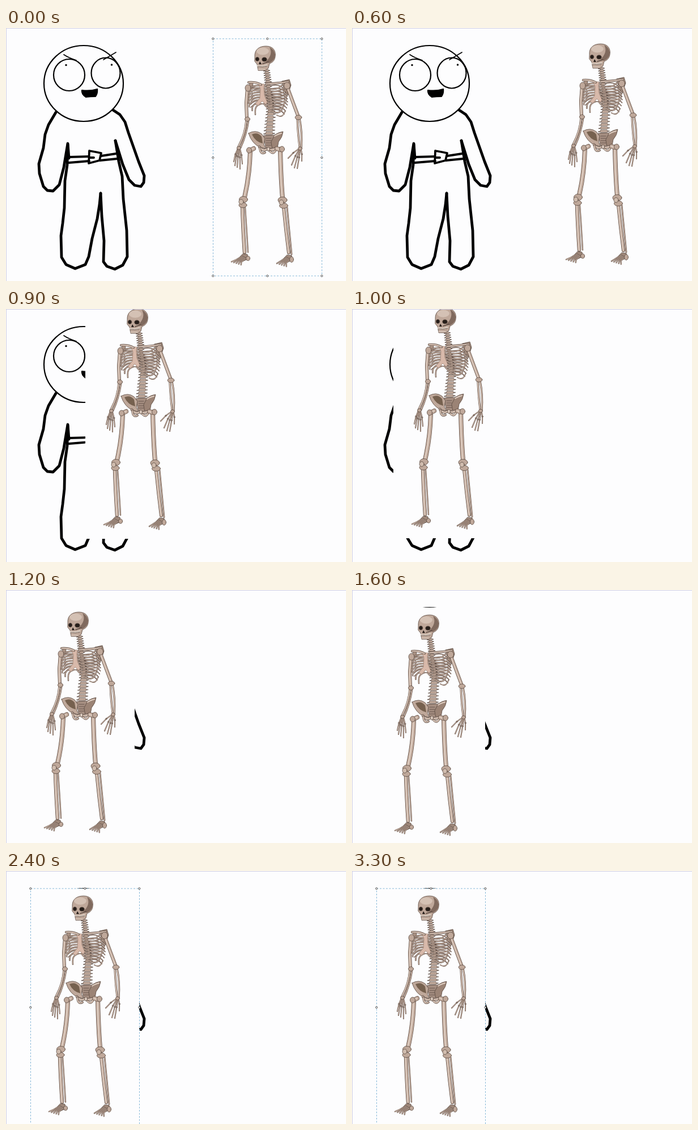
These frames come from a looping animation (600x447 px, 4 s). An HTML page:

```html
<!DOCTYPE html>
<html lang="en">
<head>
<meta charset="utf-8">
<title>Skeleton drag</title>
<style>
  html, body { margin: 0; width: 100%; height: 100%; overflow: hidden; background: #fdfdfe; }
  svg { display: block; width: 100vw; height: 100vh; }
  .ink { fill: none; stroke: #000; stroke-linecap: round; stroke-linejoin: round; }
</style>
</head>
<body>
<svg viewBox="0 0 600 447">
  <g class="ink" stroke-width="2.2">
    <ellipse cx="137" cy="98" rx="70" ry="67"/>
    <ellipse cx="111.500" cy="83" rx="27.500" ry="28"/>
    <ellipse cx="176" cy="79.500" rx="25.500" ry="27"/>
    <path stroke-width="1.7" d="M102 47Q111 53 124 57M194 43Q184 49 172 56"/>
    <circle cx="106" cy="65.500" r="1" stroke-width="1.5"/>
    <circle cx="186.500" cy="65" r="1" stroke-width="1.5"/>
    <path fill="#000" d="M134 110Q148 112 161 108Q162 115 158 121Q149 121 141 122Q133 117 134 110Z"/>
  </g>
  <g class="ink" stroke-width="4.800">
    <path d="M88 149L75 171L69 188L66 212L58 240L59 257L66 280L73 287L83 288L94 277L102 246L109 204L111 230"/>
    <path d="M109 206L108 242L104 270L103 318L100 345L97 367L98 405L106 418L122 425L140 418L146 404L152 372L161 337L165 312L167 292"/>
    <path d="M167 292L169 332L173 376L172 413L178 421L192 426L206 419L214 404L213 358L207 302L205 262L199 236L193 199"/>
    <path d="M189 145L201 153L210 166L216 185L222 202L234 236L244 261L243 273L238 280L227 278L217 268L206 241L193 199"/>
    <g stroke-width="3.800">
      <path d="M111 228L146 227M111 238L147 235M168 226L194 222M166 234L196 231"/>
      <path d="M147 217L146 239L165 234L168 221L158 219L147 217M148 229L155 229"/>
    </g>
  </g>
  <g id="pic">
    <rect x="365" y="19" width="192" height="419" fill="#fdfdfe"/>
    <g id="bones" stroke-linecap="round" stroke-linejoin="round"></g>
    <g id="frame" fill="#fff" stroke="#555" stroke-width="1">
      <rect x="365.500" y="19" width="192" height="419" fill="none" stroke="#86b8d8" stroke-dasharray="3 2.500"/>
    </g>
  </g>
  <path d="M0 .5H600M.5 0V447" stroke="#d0d0e6" fill="none"/>
</svg>
<script>
const DARK = '#59483f', MID = '#bfa89a', LIGHT = '#dfcec2';
const get = id => document.getElementById(id);
const bones = get('bones'), frame = get('frame'), pic = get('pic');

function add(parent, tag, attrs) {
  const el = document.createElementNS('http://www.w3.org/2000/svg', tag);
  for (const k in attrs) el.setAttribute(k, attrs[k]);
  return parent.appendChild(el);
}
const line = (d, stroke, w, extra) =>
  add(bones, 'path', { d, stroke, 'stroke-width': w, fill: 'none', ...extra });
const shape = (d, fill = MID, stroke = DARK, w = 0.8) =>
  add(bones, 'path', { d, fill, stroke, 'stroke-width': w });
const knob = (cx, cy, rx, ry = rx, fill = MID) =>
  add(bones, 'ellipse', { cx, cy, rx, ry, fill, stroke: DARK, 'stroke-width': 0.8 });

// A rounded bone: dark edge, mid tone, light ridge
function bone(d, w) {
  line(d, DARK, w);
  line(d, MID, Math.max(w - 1.3, w * 0.6));
  if (w > 3) line(d, LIGHT, w * 0.28, { transform: 'translate(-.5 0)' });
}

function vertebrae(x0, y0, x1, y1, n, w0, w1) {
  const step = (y1 - y0) / n;
  for (let i = 0; i <= n; i++) {
    const k = i / n, w = w0 + (w1 - w0) * k;
    const x = x0 + (x1 - x0) * k, y = y0 + step * i;
    line(`M${x - w * 0.75} ${y + 1}L${x + w * 0.75} ${y}`, DARK, 1.4);
    add(bones, 'rect', { x: x - w / 2, y: y - step * 0.4, width: w, height: step * 0.75, rx: 1.2,
      fill: MID, stroke: DARK, 'stroke-width': 0.6 });
  }
}

function torso() {
  // Back ribs behind the spine
  for (let i = 0; i < 9; i++) {
    const y = 103 + i * 5.4, reach = 26 + 6 * Math.sin(i / 8 * Math.PI);
    line(`M465 ${y}Q${465 + reach * 0.7} ${y - 6} ${465 + reach} ${y + 6}`, '#7d685d', 1.7);
    if (i < 7) line(`M462 ${y}Q440 ${y - 5} ${434 - i * 0.4} ${y + 5}`, '#857065', 1.4);
  }
  vertebrae(460, 75, 463, 99, 6, 7, 8);
  vertebrae(463, 103, 467, 147, 9, 7, 10);
  vertebrae(467, 152, 464, 192, 7, 11, 13);
  shape('M487 94L500 91L503 101L497 119L491 110Z', '#a89183');
  shape('M430 95L436 97L435 108L429 106Z', '#a89183');
  // Front ribs
  for (let i = 0; i < 9; i++) {
    const y = 102 + i * 4, drop = i * i * 0.2;
    const left = 432 - 4 * Math.sin(i / 8 * Math.PI) + (i > 6 ? (i - 6) * 4 : 0);
    const side = 487 + 9 * Math.sin(i / 8 * Math.PI);
    bone(`M450 ${y}C441 ${y - 1 + drop * 0.3} ${left - 1} ${y + drop * 0.5} ${left} ${y + 6 + drop}`, 2.5);
    bone(`M455 ${y}C463 ${y + 6 + drop * 0.3} ${side - 9} ${y + 10 + drop} ${side} ${y + drop * 0.9 - 1}`, 2.6);
  }
  bone('M478 154Q488 160 492 148', 2);
  shape('M446 99L456 99L455 106L456 119L461 131L458 135L452 129L445 137L440 134L448 124L449 108Z', '#d8b9aa', '#a3887a');
  bone('M428 96Q440 95 450 100', 4);
  bone('M459 99Q478 98 498 95', 4);
}

function skull() {
  shape('M439 51C438 37 448 32 459 32C471 32 477 40 475 51C474 58 470 61 465 63L463 71L458 75L445 75L443 64L439 59Z', MID);
  shape('M458 60L465 62Q475 57 475 47Q473 37 465 34Q472 47 458 60Z', '#806a5e', 'none');
  add(bones, 'ellipse', { cx: 453, cy: 41, rx: 11, ry: 6.5, fill: LIGHT, opacity: 0.65 });
  const hole = '#251d19';
  knob(443.5, 55, 3.2, 3.5, hole);
  knob(456, 55.5, 4.2, 3.6, hole);
  shape('M448 59L451 64L446 64Z', hole, 'none');
  line('M453 63L463 60', DARK, 1.6);
  line('M444 67Q452 69 460 66', '#eadfd4', 3);
  line('M444 68Q452 70 461 67', DARK, 0.8);
  for (let x = 446; x < 460; x += 2.5) line(`M${x} 66v4`, '#8d786d', 0.4);
  line('M445 73L457 73', LIGHT, 1.4);
}

function pelvis() {
  shape('M455 190L475 189L470 211L463 218L458 209Z', '#a58e81');
  shape('M428 186Q440 179 451 187L457 195L455 206L459 213L449 211Q434 205 428 186Z', MID);
  shape('M434 188Q444 183 451 192L453 204Q440 201 434 188Z', '#76614f', 'none');
  shape('M468 201L474 189Q481 184 489 183Q488 193 481 201L479 212L470 212Z', '#9b8375');
  line('M474 191Q481 187 486 186', LIGHT, 2);
  bone('M447 210Q454 219 462 213Q470 218 478 211', 4.5);
  bone('M448 212Q449 224 457 220', 3.8);
  bone('M477 213Q473 225 466 218', 3.8);
  knob(463, 214, 2.5, 3.5, LIGHT);
  for (let i = 0; i < 4; i++) line(`M459 ${195 + i * 4}h9`, DARK, 0.8);
}

function arms() {
  bone('M426 107L424 133L425 159', 6);
  knob(427, 106, 5, 6);
  bone('M424 163Q423 186 410 210', 3.6);
  bone('M428 163Q424 190 414 211', 3);
  knob(426, 161, 4.5, 3.8);
  bone('M496 103L506 130L515 154', 6);
  knob(496, 102, 5.5, 6);
  bone('M514 160Q515 186 518 209', 3.4);
  bone('M518 160Q523 185 521 211', 3.4);
  knob(516, 158, 5.8, 4);
  hand(411, 212, [[402, 236], [404, 243], [408, 246], [413, 249], [417, 240]]);
  hand(519, 213, [[498, 230], [504, 242], [509, 247], [514, 248], [522, 235]]);
}

function hand(x, y, tips) {
  tips.forEach(([tx, ty], i) => {
    const mx = x + (tx - x) * 0.5 + (i - 2) * 0.8, my = y + (ty - y) * 0.45;
    bone(`M${x + (i - 2) * 0.8} ${y}L${mx} ${my}L${tx} ${ty}`, 2.1);
    knob(mx, my, 1.2);
  });
  knob(x, y, 3.5, 3);
}

function legs() {
  bone('M431 217Q430 260 421 299', 8);
  bone('M437 213L431 216', 8);
  knob(429, 216, 4.5, 5);
  bone('M422 317Q425 360 427 396', 2.4);
  bone('M417 315Q418 350 421 396', 6.5);
  knob(419, 303, 7.5, 5.5);
  knob(418, 313, 7, 4.5);
  knob(415, 307, 4, 4.3, '#d0bcae');
  bone('M484 214Q485 265 488 300', 8);
  bone('M478 213L484 215', 8);
  knob(487, 214, 4.5, 5);
  bone('M496 317Q500 358 504 400', 2.8);
  bone('M490 317Q494 358 499 397', 6);
  knob(488, 304, 8, 5.5);
  knob(490, 314, 7.5, 4.5);
  knob(486, 308, 4, 4.3, '#d0bcae');
  foot(422, 402, 398, 416);
  knob(427, 407, 3.5, 4);
  foot(500, 404, 478, 419);
  knob(504, 409, 3.5, 5);
}

function foot(x, y, tx, ty) {
  shape(`M${x - 4} ${y - 3}L${x + 4} ${y - 2}L${x + 5} ${y + 6}L${x - 6} ${y + 11}L${x - 14} ${y + 8}Z`, '#9f887a');
  for (let i = 0; i < 5; i++) {
    const ex = tx + i * 4.2, ey = ty - 3 + i * 1.3;
    bone(`M${x - 5 + i * 1.6} ${y + 1 + i}L${(x + ex) / 2 - 3} ${y + 7 + i}L${ex} ${ey}`, 2.4);
  }
}

torso();
skull();
pelvis();
legs();
arms();

for (const x of [365, 461, 557])
  for (const y of [19, 229, 438])
    if (x !== 461 || y !== 229) add(frame, 'circle', { cx: x + 0.3, cy: y, r: 1.6 });

// The drag moves in hard 100 ms steps: [time, dx, dy]
const drag = [
  [0, 0, 0], [600, -20, -4], [700, -75, -14], [800, -144, -26], [900, -225, -32],
  [1000, -292, -33], [1100, -317, -28], [1200, -330, 7], [1300, -328, 11], [1400, -324, 12], [1500, -322, 12]
];

function draw(t) {
  const [, x, y] = drag.filter(k => k[0] <= t).pop();
  pic.setAttribute('transform', `translate(${x} ${y})`);
  frame.setAttribute('visibility', t < 600 || t >= 1700 ? 'visible' : 'hidden');
}

const start = performance.now();
function tick() {
  draw((performance.now() - start) % 4000);
  requestAnimationFrame(tick);
}
draw(0);
requestAnimationFrame(tick);
</script>
</body>
</html>
```
